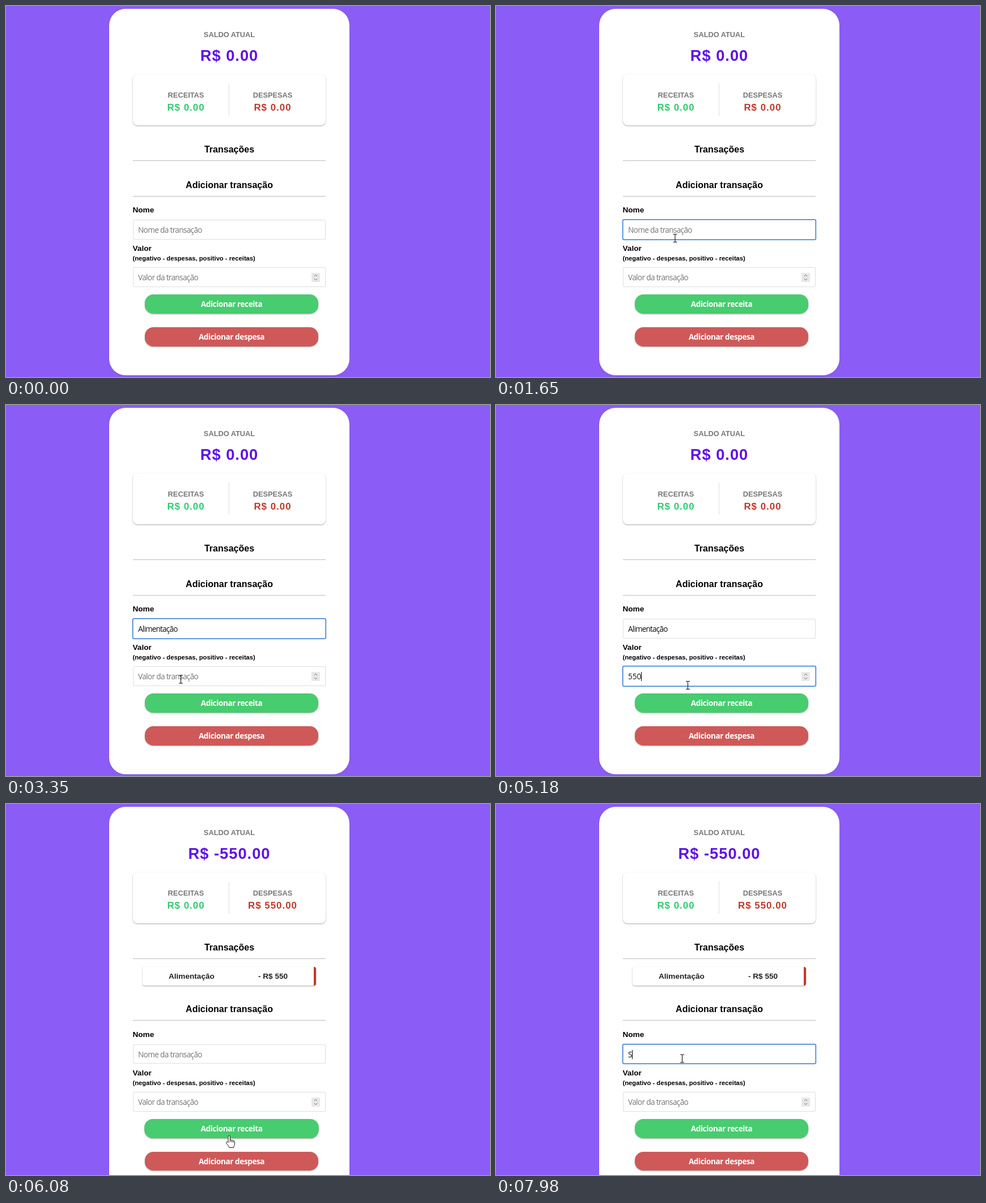
An HTML page for the animation above (8000 ms loop, 854 by 656 pixels).

```html
<!DOCTYPE html>
<html lang="pt-BR">
<head>
<meta charset="utf-8">
<title>Saldo</title>
<style>
html, body { margin: 0; width: 100%; height: 100%; overflow: hidden; background: #8b5cf6; }
body { position: relative; font: bold 13.6px/20px "Liberation Sans", Arial, sans-serif; color: #000; }
body * { position: absolute; box-sizing: border-box; white-space: pre; }
#card { left: 182px; top: 5px; width: 424px; height: 648px; border-radius: 29px; background: #fff;
  box-shadow: 0 1px 2px rgba(0,0,0,.12); }
.mid { left: 224px; width: 340px; text-align: center; }
.left { transform: translateX(-76.5px); }
.right { transform: translateX(76.5px); }
.cap { font-size: 12.8px; color: #777; }
.sum { top: 170px; font-size: 16.9px; letter-spacing: 1px; }
.head { font-size: 16px; }
#total { top: 78px; font-size: 27.3px; letter-spacing: 1px; color: #5f12e8; }
.lift { background: #fff; box-shadow: 0 1px 3px rgba(0,0,0,.12), 0 1px 2px rgba(0,0,0,.24); }
.rule { left: 224px; width: 340px; height: 1px; background: #bbb; }
.label { left: 223.5px; }
#form { left: 0; top: 0; width: 854px; height: 656px; }
.field { left: 224px; width: 340px; height: 34.8px; border: 1px solid #dedede; border-radius: 2px; background: #fff;
  font: 13.6px/34px "Open Sans", "Noto Sans", sans-serif; padding-left: 8px; color: #111; }
.field.on { border-color: #a9c6ee; box-shadow: 0 0 0 1px #1f6cd4; }
.field > * { position: static; }
.hint { color: #757575; letter-spacing: -.65px; }
#name .val { letter-spacing: -.83px; }
.caret { display: inline-block; width: 1px; height: 16px; margin-right: -1px; background: #000; vertical-align: -3px; }
.field svg { position: absolute; right: 9px; top: 9px; }
.btn { left: 245px; width: 306px; height: 33.6px; border-radius: 15px; color: #fff; text-align: center;
  font: bold 13.6px/33px "Open Sans", "Noto Sans", sans-serif; letter-spacing: -.43px;
  box-shadow: 0 1px 3px rgba(0,0,0,.12), 0 1px 2px rgba(0,0,0,.24); }
#item { left: 241px; top: 288px; width: 306px; height: 33px; border-radius: 4px; border-right: 4px solid #c0392b; color: #222; line-height: 33px; }
#mouse { left: 0; top: 0; overflow: visible; }
</style>
</head>
<body>
<div id="card"></div>
<div class="mid cap" style="top:41px">SALDO ATUAL</div>
<div class="mid" id="total"></div>
<div class="lift" style="left:224px;top:121px;width:340px;height:90px;border-radius:8px"></div>
<div style="left:393px;top:137px;width:1px;height:57px;background:#dedede"></div>
<div class="mid cap left" style="top:148px">RECEITAS</div>
<div class="mid sum left" style="color:#2ecc71">R$ 0.00</div>
<div class="mid cap right" style="top:148px">DESPESAS</div>
<div class="mid sum right" id="spent" style="color:#c0392b"></div>
<div class="mid head" style="top:244px">Transações</div>
<div class="rule" style="top:273px"></div>
<div id="item" class="lift"><span style="left:46px">Alimentação</span><span style="left:204px">- R$ 550</span></div>

<div id="form">
  <div class="mid head" style="top:306.5px">Adicionar transação</div>
  <div class="rule" style="top:335.6px"></div>
  <div class="label" style="top:351px">Nome</div>
  <div class="field" id="name" style="top:378.1px"><span class="val"></span><i class="caret"></i><span class="hint">Nome da transação</span></div>
  <div class="label" style="top:419px">Valor</div>
  <div class="label" style="top:436.3px;font-size:11.22px">(negativo - despesas, positivo - receitas)</div>
  <div class="field" id="value" style="top:462.2px"><span class="val"></span><i class="caret"></i><span class="hint">Valor da transação</span><svg width="15" height="16"><rect width="15" height="16" fill="#e8e8e8"/><path d="M4.8 6 7.5 3.3 10.2 6M4.8 10 7.5 12.7 10.2 10" fill="none" stroke="#666"/></svg></div>
  <div class="btn" id="gain" style="top:510.2px;background:#47cc6f">Adicionar receita</div>
  <div class="btn" id="loss" style="top:568.2px;background:#cf5959">Adicionar despesa</div>
</div>

<svg id="mouse" width="24" height="24">
  <path id="arrow" d="M.5 .5V16.2L4.1 12.8 6.4 18.2 8.9 17.1 6.6 11.8H11.6Z" fill="#fff" stroke="#000"/>
  <path id="beam" d="M-3.5-7H-1Q0-7 0-6V6Q0 7-1 7H-3.5M3.5-7H1Q0-7 0-6V6Q0 7 1 7H3.5" fill="none" stroke="#111" stroke-width="1.1"/>
  <path id="hand" transform="translate(-7 -1)" d="M5.5 12.5V2.2a1.7 1.7 0 0 1 3.4 0V8.2c1-.6 2.6-.4 3 .6 1-.5 2.3-.2 2.7.8 1.2-.4 2.3.3 2.3 1.6V15c0 2.6-1.5 4-1.9 6.6H7.6C7 19 4 16.5 2.2 13.6 1.4 12 2.8 10.6 4.2 11.4ZM8.9 8.2V12M11.9 9V12.2M14.6 10V12.6" fill="#fff" stroke="#111"/>
</svg>

<script>
const LOOP = 8000, ADDED = 6010, SHIFT = 46.6, BLINK = 530, STEP = 70;
const $ = id => document.getElementById(id);
const show = (el, on) => el.style.visibility = on ? 'visible' : 'hidden';
const clamp = v => Math.min(1, Math.max(0, v));

const home = { x: 588, y: 531 };
const moves = [
  { from: 70, to: 770, x: 345, y: 385 },
  { from: 910, to: 1610, x: 316, y: 410.5 },
  { from: 2870, to: 3150, x: 308.5, y: 485 },
  { from: 4340, to: 5180, x: 338.5, y: 495.5 },
  { from: 5180, to: 5740, x: 393.5, y: 587 },
  { from: 6160, to: 6650, x: 386, y: 533.5 },
  { from: 6720, to: 7210, x: 328.5, y: 450 }
];

const edits = [
  { id: 'name', word: 'Alimentação', focus: 910, blur: 3570, keys: 2000, gap: 62 },
  { id: 'value', word: '550', focus: 3570, blur: ADDED, keys: 4700, gap: 150 },
  { id: 'name', word: 'S', focus: 7190, blur: LOOP, keys: 7980, gap: 80 }
];

// The pointer moves in steps and eases into and out of each stop.
function pointer(t) {
  const q = Math.floor(t / STEP) * STEP;
  let { x, y } = home;
  for (const m of moves) {
    const k = clamp((q - m.from) / (m.to - m.from)), ease = k * k * (3 - 2 * k);
    x += (m.x - x) * ease;
    y += (m.y - y) * ease;
  }
  return [x, y];
}

function over(id, x, y, dy) {
  const el = $(id), top = el.offsetTop + dy;
  return x >= el.offsetLeft && x <= el.offsetLeft + el.offsetWidth && y >= top && y <= top + el.offsetHeight;
}

function drawField(id, t) {
  const field = $(id);
  const edit = edits.findLast(e => e.id === id && t >= e.focus && (t < ADDED || e.focus >= ADDED));
  const on = !!edit && t < edit.blur;
  let text = '', since = 0;
  if (edit) {
    const count = Math.min(edit.word.length, Math.max(0, Math.floor((t - edit.keys) / edit.gap) + 1));
    text = edit.word.slice(0, count);
    since = count ? edit.keys + (count - 1) * edit.gap : edit.focus;
  }
  field.classList.toggle('on', on);
  field.querySelector('.val').textContent = text;
  field.querySelector('.hint').style.display = text ? 'none' : '';
  show(field.querySelector('.caret'), on && Math.floor((t - since) / BLINK) % 2 === 0);
}

function pulse(id, t, from) {
  const wave = Math.sin(Math.PI * clamp((t - from) / 300)) ** 2;
  $(id).style.transform = `scale(${1 + .05 * wave})`;
}

function draw(t) {
  const added = t >= ADDED, dy = added ? SHIFT : 0;
  $('total').textContent = added ? 'R$ -550.00' : 'R$ 0.00';
  $('spent').textContent = added ? 'R$ 550.00' : 'R$ 0.00';
  show($('item'), added);
  $('form').style.top = dy + 'px';
  $('card').style.height = 648 + dy + 'px';

  drawField('name', t);
  drawField('value', t);
  pulse('loss', t, 5510);
  pulse('gain', t, 6050);

  const [x, y] = pointer(t);
  const hit = ids => ids.some(id => over(id, x, y, dy));
  const kind = hit(['name', 'value']) ? 'beam' : hit(['gain', 'loss']) ? 'hand' : 'arrow';
  const typing = edits.some(e => t >= e.keys && t < e.keys + e.word.length * e.gap) && t < 7900;
  const parked = t >= 2000 && t < moves[2].from;
  $('mouse').style.transform = `translate(${x}px, ${y}px)`;
  for (const id of ['arrow', 'beam', 'hand']) show($(id), id === kind && t >= STEP && !typing && !parked);
}

const start = performance.now();
function tick() {
  draw((performance.now() - start) % LOOP);
  requestAnimationFrame(tick);
}
draw(0);
requestAnimationFrame(tick);
</script>
</body>
</html>
```
